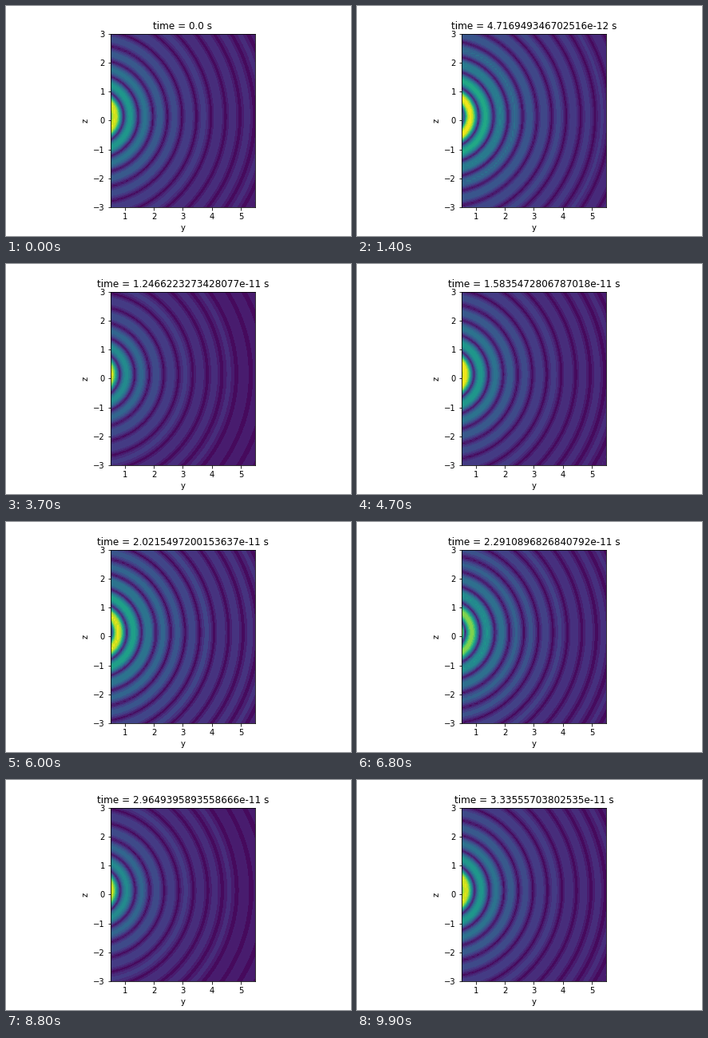
Write a matplotlib script that moves like this. It is 432 px wide and 288 px high and loops after 10 s.

```python
import numpy as np
import matplotlib.pyplot as plt
from matplotlib.animation import FuncAnimation

FRAMES = 100
C = 2.998e8         # wave speed, m/s
WAVELENGTH = 0.01   # m, one unit on the axes
PERIOD = WAVELENGTH / C
SOURCE_Z = 0.14
LAG = 0.12          # rad
LEVELS = 20
GRID = 80

plt.rcParams.update({"font.family": "DejaVu Sans", "text.kerning_factor": 6})

times = np.linspace(0, PERIOD, FRAMES)
Y, Z = np.meshgrid(np.linspace(0.5, 5.5, GRID), np.linspace(-3, 3, GRID))
R = np.hypot(Y, Z - SOURCE_Z)
KR = 2 * np.pi * R
# Dipole radiation with its near-field term
WAVE = (1 + 1j / KR) * np.exp(1j * (KR + LAG)) / R

fig, ax = plt.subplots(figsize=(6, 4), dpi=72, facecolor="white")
fig.subplots_adjust(left=0.125, right=0.9, bottom=0.125, top=0.88)
ax.set_aspect("equal")
ax.set(xlim=(0.5, 5.5), ylim=(-3, 3), xlabel="y", ylabel="z")
ax.set_xticks(range(1, 6))
ax.set_yticks(range(-3, 4))

contours = None


def field(t):
    return np.abs(np.imag(WAVE * np.exp(-2j * np.pi * t / PERIOD)))


def draw(i):
    global contours
    if contours is not None:
        contours.remove()
    # Levels are chosen anew each time, so colours follow the current peak.
    contours = ax.contourf(Y, Z, field(times[i]), LEVELS, cmap="viridis")
    ax.set_title(f"time = {float(times[i])} s")
    return [contours]


anim = FuncAnimation(fig, draw, frames=FRAMES, init_func=lambda: draw(0),
                     interval=100, repeat=True, repeat_delay=0)
plt.show()
```
